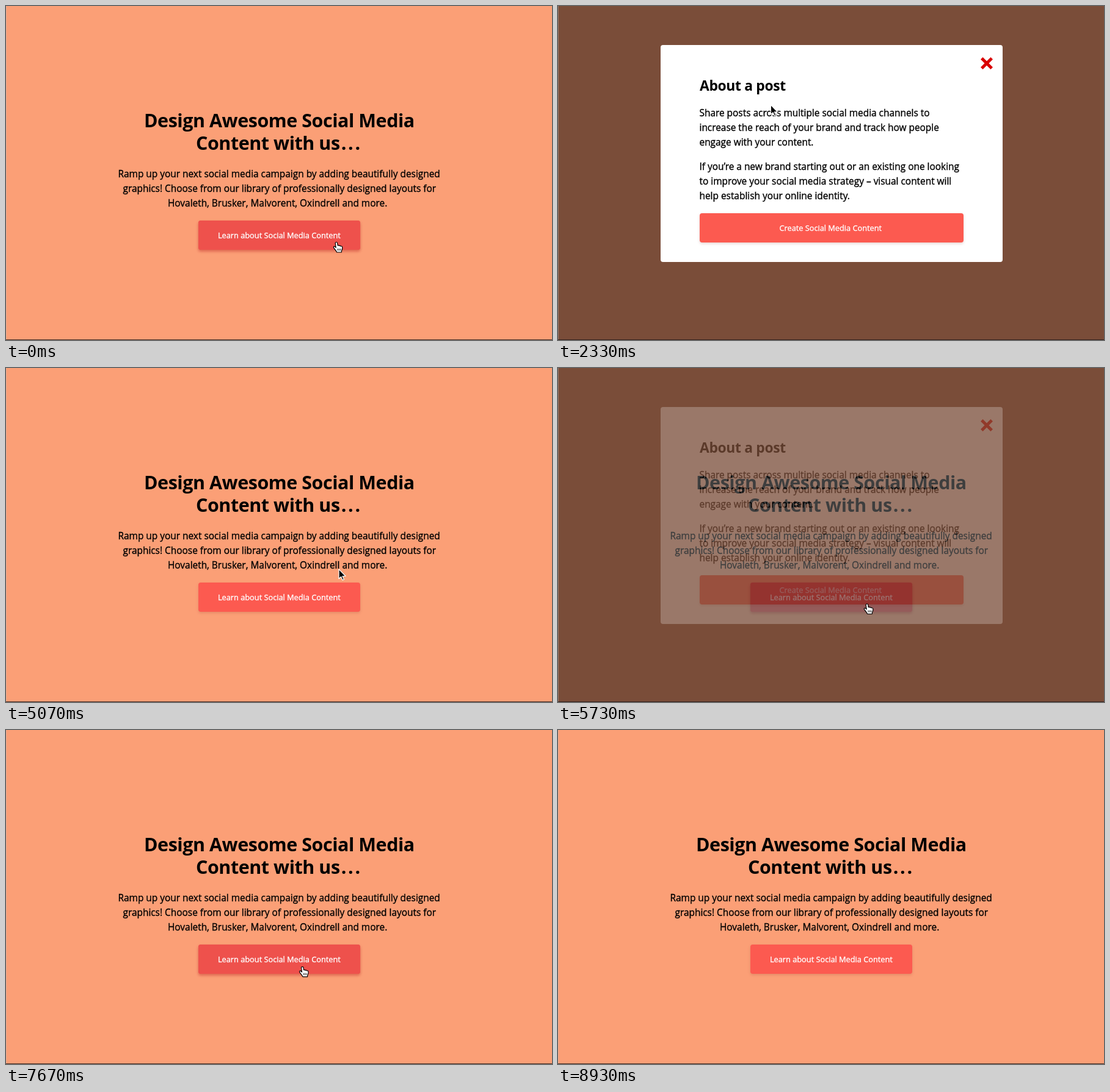
An HTML page that plays this animation: 894x548 px, repeating every 8.99 s.

```html
<!DOCTYPE html>
<html lang="en">
<head>
<meta charset="utf-8">
<title>Modal demo</title>
<style>
  html, body { margin: 0; width: 100%; height: 100%; overflow: hidden; background: #fb9f76; }
  svg { display: block; font: 15.41px "Open Sans", "Noto Sans", sans-serif; }
  text { stroke: #000; stroke-width: .35; }
  .title { font-size: 30.4px; font-weight: 700; letter-spacing: -.0135em; }
  .subtitle { font-size: 22.8px; font-weight: 700; letter-spacing: -.0135em; }
  .title text, .subtitle { stroke: none; }
  .dots { letter-spacing: .09em; }
  .label { font-size: 12.76px; fill: #fff; stroke: #fff; }
  .button { fill: #fc5a50; filter: drop-shadow(0 2px 2px rgba(150, 60, 50, .22)); }
  .hover { fill: #ee514c; filter: drop-shadow(0 3px 2px rgba(215, 55, 50, .4)); }
  .outline { stroke-width: 1.2; stroke-linejoin: round; }
</style>
</head>
<body>
<svg width="894" height="548" viewBox="0 0 894 548">
  <rect width="894" height="548" fill="#fb9f76"/>
  <g class="title">
    <text x="226" y="199">Design Awesome Social Media</text>
    <text x="311" y="236">Content with us<tspan class="dots" dx="2">...</tspan></text>
  </g>
  <text x="183.5" y="281">Ramp up your next social media campaign by adding beautifully designed</text>
  <text x="191.5" y="305">graphics! Choose from our library of professionally designed layouts for</text>
  <text x="265" y="329">Hovaleth, Brusker, Malvorent, Oxindrell and more.</text>
  <rect class="button" x="315" y="352" width="265" height="48" rx="4"/>
  <rect class="hover" id="learnHover" x="315" y="352" width="265" height="48" rx="4"/>
  <text class="label" x="347" y="381">Learn about Social Media Content</text>

  <rect id="overlay" width="894" height="548" fill="#000" fill-opacity=".515"/>

  <g id="modal">
    <rect x="168" y="64" width="560" height="356" rx="4" fill="#fff"/>
    <path d="M693.8 85.8l16.4 16.4m0-16.4l-16.4 16.4" stroke="#d90000" stroke-width="5"/>
    <text class="subtitle" x="232" y="139">About a post</text>
    <text x="231.5" y="181">Share posts across multiple social media channels to</text>
    <text x="231.5" y="205">increase the reach of your brand and track how people</text>
    <text x="231.5" y="229">engage with your content.</text>
    <text x="231.5" y="269">If you’re a new brand starting out or an existing one looking</text>
    <text x="231.5" y="293">to improve your social media strategy – visual content will</text>
    <text x="231.5" y="317">help establish your online identity.</text>
    <rect class="button" x="232" y="340" width="432" height="48" rx="4"/>
    <rect class="hover" id="createHover" x="232" y="340" width="432" height="48" rx="4"/>
    <text class="label" x="362.5" y="369">Create Social Media Content</text>
  </g>

  <rect width="1" height="548" fill="#c8c8c8" fill-opacity=".35"/>
  <rect y="547" width="894" height="1" fill="#2a1c18" fill-opacity=".85"/>

  <g id="cursor">
    <path id="arrow" class="outline" fill="#000" stroke="#fff"
      d="M0 0V15.6L3.6 12.3L6 17.8L8.4 16.8L6 11.4H11Z"/>
    <g id="hand" class="outline" fill="#fff" stroke="#000">
      <path d="M-1.8 1.5Q-1.6 0 0 0Q1.5 0 1.6 1.5L2.2 5.5Q3.5 4.6 4.6 6Q6 5.2 7 6.7Q9.2 6 9.7 8
        Q10.2 11 8.5 14L8.3 16.5H.6Q-.5 14-3.5 10.5Q-5.5 8-4 7Q-2.5 6.6-.8 9Z"/>
      <path d="M2 10.5V14M4.3 10.5V14M6.6 10.5V14" stroke-width=".9"/>
    </g>
  </g>
</svg>
<script>
  const LOOP = 8990, FADE = 300, HOVER = 130;

  // Time spans [from, to] in ms
  const openSpans = [[70, 4470], [5635, 6530], [7690, 8620]];
  const learnSpans = [[-200, 70], [5130, 5740], [7420, 7690]];
  const createSpans = [[70, 500], [5760, 5860], [7650, 7930]];
  const handSpans = [[0, 500], [5130, 5760], [7420, 7780]];

  // Cursor stops: time, x, y
  const stops = [
    [0, 541, 387.5], [450, 541, 387.5], [1000, 430, 320], [2000, 345, 163], [2270, 345, 163],
    [3330, 702, 101], [4500, 702, 101], [5300, 506, 387], [5750, 506, 387],
    [6450, 791.5, 342], [6750, 791.5, 342], [7550, 486, 388], [7900, 483.5, 389],
    [8260, 757, 416], [8610, 757, 416], [8900, 910, 470], [LOOP, 910, 470]
  ];

  const byId = id => document.getElementById(id);
  const clamp = u => Math.min(1, Math.max(0, u));
  const smooth = u => u * u * (3 - 2 * u);
  const spanAt = (spans, t) => spans.find(([from, to]) => t >= from && t < to);

  // Ramps up after each span starts and back down after it ends
  const hoverAt = (spans, t) => Math.max(...spans.map(([from, to]) =>
    Math.min(clamp((t - from) / HOVER), clamp(1 - (t - to) / HOVER))));

  function cursorAt(t) {
    const next = stops.findIndex(stop => stop[0] > t);
    const [t0, x0, y0] = stops[next - 1], [t1, x1, y1] = stops[next];
    const u = smooth((t - t0) / (t1 - t0));
    return [x0 + (x1 - x0) * u, y0 + (y1 - y0) * u];
  }

  const show = (id, visible) => byId(id).style.display = visible ? "" : "none";

  function draw(now) {
    const t = now % LOOP;
    const open = spanAt(openSpans, t);
    show("overlay", open);
    show("modal", open);
    if (open) byId("modal").style.opacity = smooth(clamp((t - open[0]) / FADE));

    byId("learnHover").style.opacity = hoverAt(learnSpans, t);
    byId("createHover").style.opacity = hoverAt(createSpans, t);

    const hand = spanAt(handSpans, t);
    show("hand", hand);
    show("arrow", !hand);
    byId("cursor").setAttribute("transform", `translate(${cursorAt(t)})`);
    requestAnimationFrame(() => draw(performance.now()));
  }
  draw(0);
</script>
</body>
</html>
```
